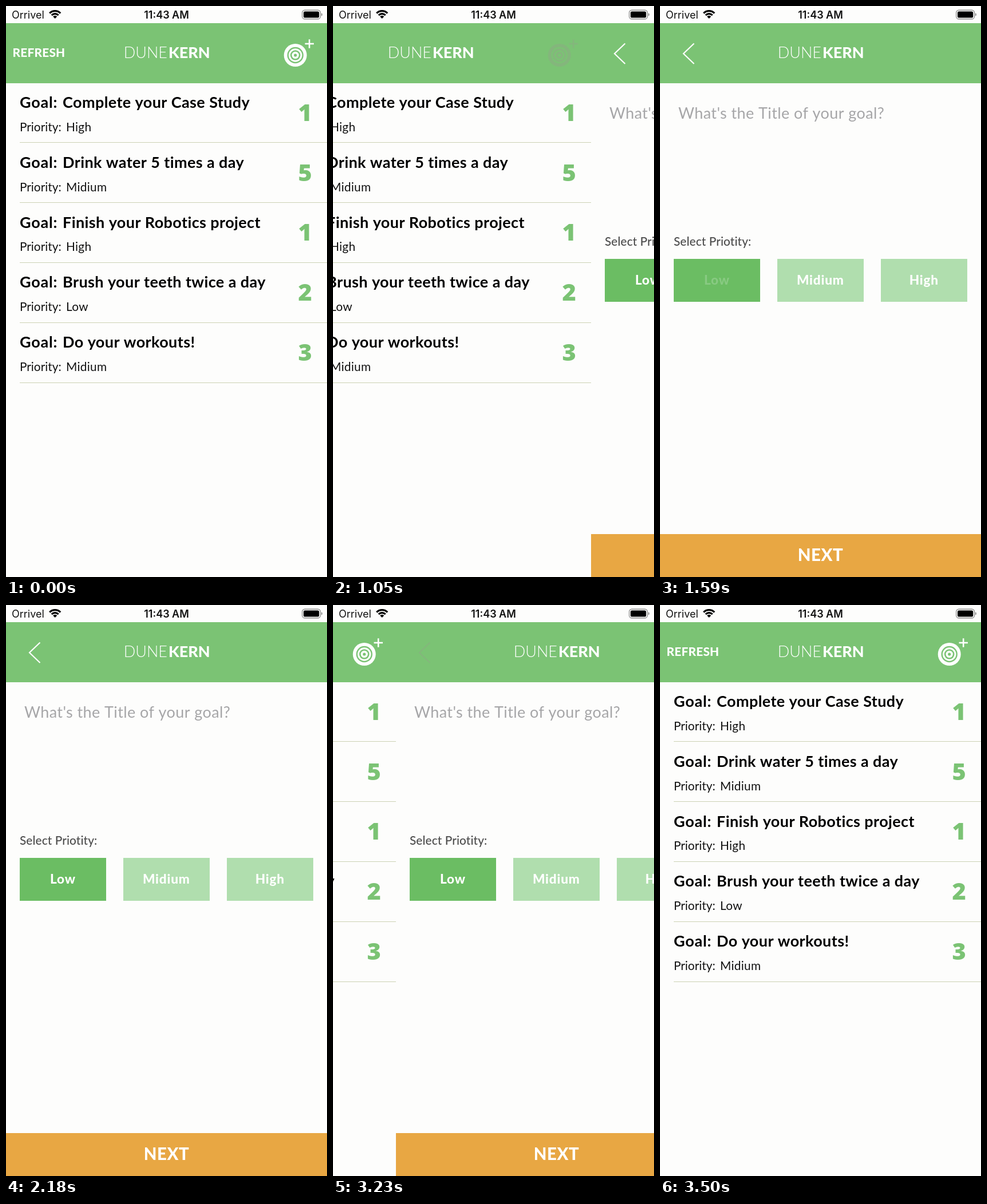
Write an HTML page with a canvas that moves like this. It is 561x998 px and loops after 3.55 s.

```html
<!DOCTYPE html>
<html lang="en">
<head>
<meta charset="utf-8">
<title>Goal list</title>
<style>
  html, body { margin: 0; width: 100%; height: 100%; overflow: hidden; background: #fdfdfc; }
  canvas { display: block; width: 100vw; height: 100vh; }
</style>
</head>
<body>
<canvas id="stage" width="561" height="998"></canvas>
<script>
const W = 561, H = 998, LOOP = 3550;
const ctx = document.getElementById('stage').getContext('2d');

const PAPER = '#fdfdfc', GREEN = '#7bc374', PICKED = '#6bbd63', PALE = '#b0deae';
const ORANGE = '#e8a743', RULE = '#ccd2b4', DIM = '#84b67c';
const LATO = 'Lato, sans-serif', UI = 'Inter, sans-serif', DIGITS = '"Open Sans", sans-serif';

const goals = [
  ['Complete your Case Study', 'High', 1],
  ['Drink water 5 times a day', 'Midium', 5],
  ['Finish your Robotics project', 'High', 1],
  ['Brush your teeth twice a day', 'Low', 2],
  ['Do your workouts!', 'Midium', 3]
];
const ROW = 104.8;

const clamp = v => Math.max(0, Math.min(1, v));

function text(str, x, y, weight, size, color, { align = 'left', family = LATO, gap = 0 } = {}) {
  ctx.font = `${weight} ${size}px ${family}`;
  ctx.letterSpacing = gap + 'px';
  ctx.textAlign = align;
  ctx.fillStyle = color;
  ctx.fillText(str, x, y);
}

function rect(x, y, w, h, color) {
  ctx.fillStyle = color;
  ctx.fillRect(x, y, w, h);
}

function line(points, width, color) {
  ctx.beginPath();
  points.forEach(([x, y]) => ctx.lineTo(x, y));
  ctx.lineWidth = width;
  ctx.strokeStyle = color;
  ctx.stroke();
}

function disc(x, y, r, color) {
  ctx.beginPath();
  ctx.arc(x, y, r, 0, Math.PI * 2);
  ctx.fillStyle = color;
  ctx.fill();
}

function pill(x, y, w, h, r) {
  ctx.beginPath();
  ctx.roundRect(x, y, w, h, r);
}

function wifi(x, y) {
  const a = -Math.PI * 0.75, b = -Math.PI * 0.25;
  ctx.strokeStyle = ctx.fillStyle = '#000';
  ctx.lineWidth = 3.2;
  for (const r of [13.4, 8.4]) {
    ctx.beginPath();
    ctx.arc(x, y, r, a, b);
    ctx.stroke();
  }
  ctx.beginPath();
  ctx.moveTo(x, y);
  ctx.arc(x, y, 5, a, b);
  ctx.fill();
}

function battery() {
  pill(517.7, 7.2, 31.8, 15.6, 4.6);
  ctx.lineWidth = 1.4;
  ctx.strokeStyle = '#8f8f8f';
  ctx.stroke();
  ctx.fillStyle = '#000';
  pill(520, 9.5, 27.2, 11, 2.6);
  ctx.fill();
  ctx.fillStyle = '#8f8f8f';
  pill(551, 12.4, 1.8, 5.2, [0, 2, 2, 0]);
  ctx.fill();
}

function statusBar() {
  text('Orrivel', 10, 21.7, 400, 18, '#111', { family: UI });
  wifi(85.7, 22);
  text('11:43 AM', W / 2, 21.7, 600, 18, '#111', { family: UI, align: 'center' });
  battery();
}

function appName() {
  text('DUNE', 282, 91.3, 300, 27, '#fff', { align: 'right' });
  text('KERN', 284, 91.3, 800, 27, '#fff');
}

function addIcon(color) {
  const x = 505.7, y = 86;
  [[20, color], [14.2, GREEN], [11.8, color], [8.8, GREEN], [6.2, color], [2.6, GREEN]]
    .forEach(([r, c]) => disc(x, y, r, c));
  line([[522.5, 66], [538, 66]], 2.6, color);
  line([[530.2, 58.3], [530.2, 73.7]], 2.6, color);
}

function listScreen(pressed) {
  text('REFRESH', 11.5, 89, 800, 20.8, '#fff', { gap: 0.25 });
  appName();
  addIcon(pressed ? DIM : '#fff');
  goals.forEach(([title, priority, count], i) => {
    const y = i * ROW;
    text('Goal:', 24, y + 178, 700, 27, '#000', { gap: 0.8 });
    text(title, 99, y + 178, 700, 27, '#000', { gap: 0.4 });
    text('Priority:', 24, y + 218.7, 400, 20.8, '#111');
    text(priority, 105, y + 218.7, 400, 20.8, '#111', { gap: 0.3 });
    text(count, 522.7, y + 200.8, 800, 41.5, GREEN, { align: 'center', family: DIGITS });
    rect(24, Math.round(y + 238.4), W - 24, 1, RULE);
  });
}

function formScreen(lowAlpha, backPressed) {
  line([[59.5, 65.5], [41, 83.3], [59.5, 101]], 2.2, backPressed ? DIM : '#fff');
  appName();
  text("What's the Title of your goal?", 32, 197, 400, 27, '#a6a6a8', { gap: 0.4 });
  text('Select Priotity:', 24, 419, 500, 20.8, '#4c4c4c', { gap: 0.1 });
  ['Low', 'Midium', 'High'].forEach((label, i) => {
    const x = 24 + i * 181;
    rect(x, 442, 151, 75, i ? PALE : PICKED);
    text(label, x + 75.3, 487, 800, 22.6, `rgba(255,255,255,${i ? 1 : lowAlpha})`,
      { align: 'center', gap: 0.8 });
  });
  rect(0, 923, W, 75, ORANGE);
  text('NEXT', W / 2, 970, 800, 29.4, '#fff', { align: 'center', gap: 0.6 });
}

const tick = (t, origin, len) => origin + Math.floor((t - origin) / len + 1e-6) * len;
const ease = (t, start, end) => Math.pow(clamp((t - start) / (end - start)), 1.25);

function slide(t) {
  if (t < 860) return 0;
  if (t < 1270) return ease(tick(t, 860, 410 / 9), 957, 1270);
  if (t < 3140) return 1;
  return 1 - ease(tick(t, 3140, 45), 3133, 3490);
}

function lowLabelAlpha(t) {
  if (t < 1590 || t >= 2230) return 1;
  if (t < 1680) return 0.2;
  const p = clamp((tick(t, 1680, 45) - 1635) / 500);
  return 0.2 + 0.8 * p * p * (3 - 2 * p);
}

function at(x, paint) {
  if (x <= -W || x >= W) return;
  ctx.save();
  ctx.translate(x, 0);
  paint();
  ctx.restore();
}

function draw(t) {
  const shift = Math.round(slide(t) * W);
  rect(0, 0, W, H, PAPER);
  rect(0, 30, W, 105, GREEN);
  at(-shift, () => listScreen(t >= 860 && t < 1590));
  at(W - shift, () => formScreen(lowLabelAlpha(t), t >= 3000));
  statusBar();
}

const begin = performance.now();
function frame() {
  draw((performance.now() - begin) % LOOP);
  requestAnimationFrame(frame);
}
frame();
</script>
</body>
</html>
```
